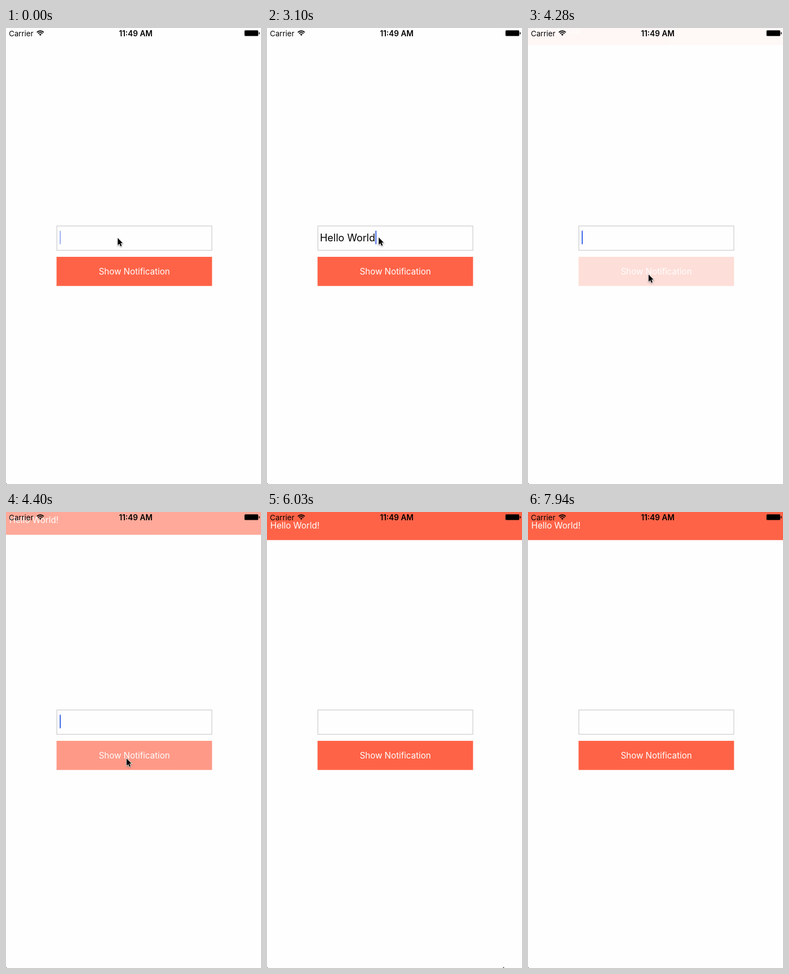
Recreate the animation shown at these times as an HTML page. Size 461 by 825 pixels, loop 8 s.

```html
<!DOCTYPE html>
<html lang="en">
<head>
<meta charset="utf-8">
<title>Notification demo</title>
<style>
  html, body { margin: 0; width: 100%; height: 100%; overflow: hidden; background: #fefefe; }
  svg { display: block; width: 461px; height: 825px; font-family: Inter, Roboto, sans-serif; }
  text { white-space: pre; }
</style>
</head>
<body>
<svg viewBox="0 0 461 825">
  <rect x="91.9" y="358.25" width="280.3" height="44" fill="#fefefe" stroke="#d5d5d7" stroke-width="1.5"/>
  <text id="typed" x="95.8" y="386.3" font-size="18.25"></text>
  <rect id="caret" y="366.5" width="2" height="25" rx="1" fill="#4069e5"/>

  <g id="button">
    <rect x="91.4" y="414" width="281.1" height="52.7" fill="#ff6347"/>
    <text x="232" y="446" font-size="15.4" fill="#fff" text-anchor="middle">Show Notification</text>
  </g>

  <g id="banner">
    <rect y="-40" width="461" height="90.8" fill="#ff6347"/>
    <text x="6" y="29.8" font-size="15.45" fill="#fff">Hello World!</text>
  </g>

  <g id="status">
    <text x="5.3" y="14.6" font-size="13.5">Carrier</text>
    <text x="234.5" y="14.6" font-size="13.9" font-weight="600" text-anchor="middle">11:49 AM</text>
    <path d="M55.8 7.8a8.8 8.8 0 0 1 12.4 0M58 10a5.6 5.6 0 0 1 8 0" fill="none" stroke="#000" stroke-width="1.8"/>
    <path d="M62 14l-2.2-2.2a3.1 3.1 0 0 1 4.4 0z"/>
    <rect x="431.2" y="4.3" width="24.8" height="10.2" rx="1.5"/>
    <rect x="457" y="7.6" width="1.5" height="3.8" rx=".6"/>
  </g>

  <rect y="824" width="1" height="1"/>
  <g id="pointer">
    <path d="M0 0V13L3 10.2 5.1 14.9 7.2 14 5.2 9.3H9.1Z" stroke="#fff" stroke-width="1.6" paint-order="stroke"
      style="filter: drop-shadow(0 1px 1px #0006)"/>
  </g>
</svg>
<script>
const LOOP = 8000;
const MESSAGE = "Hello World!";
const TYPE_START = 1800, KEY_GAP = 112, BURST = 10;
const CLEAR_TIME = 4230;
const BLINK = 985;

const [typed, caret, button, banner, pointer] =
  ["typed", "caret", "button", "banner", "pointer"].map(id => document.getElementById(id));

const ramp = (t, from, to) => Math.min(1, Math.max(0, (t - from) / (to - from)));
const ease = (t, from, to) => {
  const p = ramp(t, from, to);
  return p * p * (3 - 2 * p);
};

// A quick burst of keys, then the last two after pauses.
function typedCount(t) {
  if (t < TYPE_START || t >= CLEAR_TIME) return 0;
  const burst = Math.min(BURST, 1 + Math.floor((t - TYPE_START) / KEY_GAP));
  return burst + (t >= 3100) + (t >= 3690);
}

// The caret blinks when idle and stays solid while typing.
function caretAlpha(t) {
  const start = t < TYPE_START ? -100 : 4785;
  if (t < start || (t > 1600 && t < start + BLINK && start < 0)) return 1;
  const phase = (t - start) % BLINK;
  return 1 - ramp(phase, 0, 200) + ramp(phase, 500, 590);
}

// Drift up, glide to the button, settle on it, leave the stage.
function pointerAt(t) {
  const down = ease(t, 3230, 3460), settle = ease(t, 3750, 3990), leave = ease(t, 5640, 6030);
  const x = 202 + 16 * down + 209 * leave;
  const y = 380 - ease(t, 1390, 1500) + 52 * down + 15 * settle + 377 * leave;
  return [x, y];
}

function draw(t) {
  const count = typedCount(t);
  const text = MESSAGE.slice(0, count);
  if (typed.textContent !== text) typed.textContent = text;
  caret.setAttribute("x", 97 + (count ? typed.getComputedTextLength() - 1 : 0));
  caret.setAttribute("opacity", caretAlpha(t));

  const pressed = ramp(t, 4150, 4220) - ease(t, 4285, 4500);
  button.setAttribute("opacity", 1 - 0.8 * pressed);

  const shown = ease(t, 4245, 4540);
  banner.setAttribute("opacity", shown);
  banner.setAttribute("transform", `translate(0 ${-21 * (1 - shown)})`);

  pointer.setAttribute("transform", `translate(${pointerAt(t)})`);
  pointer.setAttribute("opacity", t < 6270 ? 1 : 0);
}

const start = performance.now();
function tick() {
  draw((performance.now() - start) % LOOP);
  requestAnimationFrame(tick);
}
tick();
</script>
</body>
</html>
```
